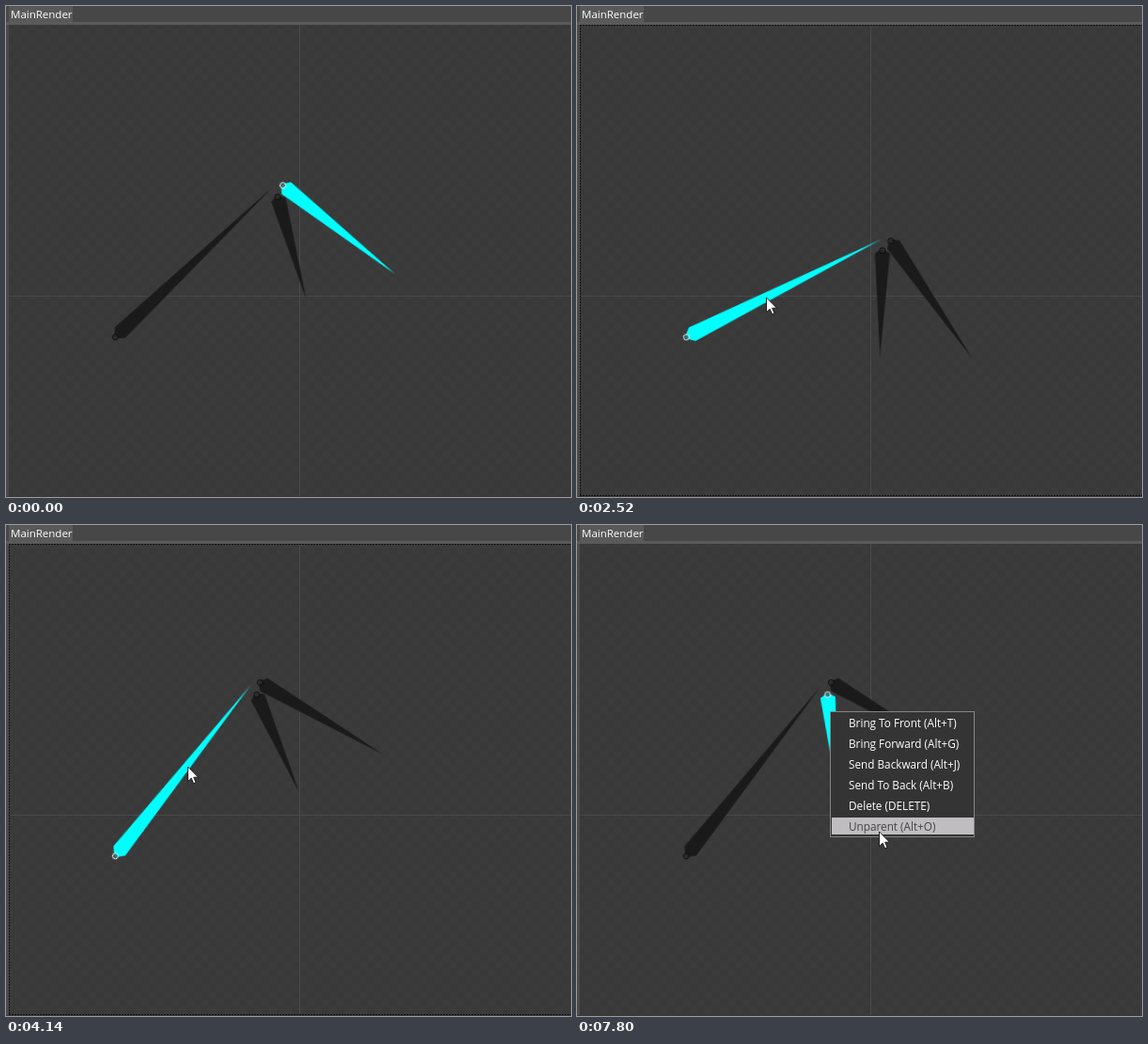
Animation, 601 px wide and 522 px high, one loop 8000 ms. Source, as an HTML page:

```html
<!DOCTYPE html>
<html lang="en">
<head>
<meta charset="utf-8">
<title>Bone editor</title>
<style>
html, body { margin: 0; width: 100%; height: 100%; overflow: hidden; background: #3a3a3a; }
svg { display: block; width: 601px; height: 522px; }
text { font-family: "Open Sans", "Noto Sans", sans-serif; }

/* All tracks share one 8 s clock, so 1% is 80 ms. */
.arm, .forearm, .cursor { animation: 8s linear infinite; }
.bone, .focus, .menu, .item { animation: 8s step-end infinite; }

.arm { transform-origin: 116px 352px; animation-name: swing; }
.forearm { transform-origin: 289px 203px; animation-name: bend; }
@keyframes swing {
  0%, 24.75% { transform: rotate(0deg); }
  27% { transform: rotate(2.7deg); }
  29.25% { transform: rotate(10deg); }
  31.5% { transform: rotate(17deg); }
  33% { transform: rotate(13deg); }
  34.5% { transform: rotate(4deg); }
  35.25% { transform: rotate(-1.5deg); }
  36% { transform: rotate(-7deg); }
  36.75% { transform: rotate(-11.2deg); }
  37.5% { transform: rotate(-14deg); }
  38.25%, 40.5% { transform: rotate(-15.4deg); }
  44.25%, 47.25% { transform: rotate(4.3deg); }
  51.75%, 100% { transform: rotate(-8deg); }
}
@keyframes bend {
  0%, 69.75% { transform: rotate(0deg); }
  72.75%, 75% { transform: rotate(-11.8deg); }
  79.5%, 100% { transform: rotate(17.6deg); }
}

.bone { color: #1a1a1a; stroke: #0b0b0b; }
.bone path { fill: currentColor; stroke: none; }
.bone circle { fill: #333; fill-opacity: .6; }
.pick-first { animation-name: first; }
.pick-second { animation-name: second; }
.pick-third { animation-name: third; }
@keyframes first {
  0% { color: #0ff; stroke: #eee; }
  23.25%, 100% { color: #1a1a1a; stroke: #0b0b0b; }
}
@keyframes second {
  0%, 69.75%, 100% { color: #1a1a1a; stroke: #0b0b0b; }
  23.25% { color: #0ff; stroke: #eee; }
}
@keyframes third {
  0% { color: #1a1a1a; stroke: #0b0b0b; }
  69.75%, 100% { color: #0ff; stroke: #eee; }
}

.focus { visibility: hidden; animation-name: focus; }
@keyframes focus {
  0%, 86.25%, 100% { visibility: hidden; }
  23.25% { visibility: visible; }
}

.menu { visibility: hidden; animation-name: open; font-size: 11.75px; }
@keyframes open {
  0% { visibility: hidden; }
  87%, 100% { visibility: visible; }
}
.item { color: #fff; fill-opacity: 0; animation-name: hover; animation-delay: calc(var(--i) * 87ms); }
.item rect { fill: #bfbdbf; }
.item text { fill: currentColor; fill-opacity: 1; }
.item.last { animation-name: stay; animation-delay: 0s; }
@keyframes hover {
  0%, 88.98%, 100% { color: #fff; fill-opacity: 0; }
  87.9% { color: #444; fill-opacity: 1; }
}
@keyframes stay {
  0% { color: #fff; fill-opacity: 0; }
  93.3%, 100% { color: #444; fill-opacity: 1; }
}

.cursor { animation-name: point; }
@keyframes point {
  0%, 9.74% { transform: translate(384px, 395px); }
  9.75% { transform: translate(384px, 395px); }
  15.75%, 24.75% { transform: translate(181px, 292px); }
  27% { transform: translate(185px, 292px); }
  31.5% { transform: translate(201px, 309px); }
  35.25% { transform: translate(189px, 279px); }
  36.75% { transform: translate(180px, 260px); }
  38.25%, 40.5% { transform: translate(174px, 255px); }
  44.25%, 47.25% { transform: translate(207px, 278px); }
  51.75%, 59.25% { transform: translate(193px, 256px); }
  63.5% { transform: translate(286px, 205px); }
  65.25%, 69.75% { transform: translate(272px, 192px); }
  72.75%, 75% { transform: translate(276px, 193px); }
  79.5%, 87.75% { transform: translate(269px, 198px); }
  94%, 100% { transform: translate(321px, 325px); }
}
.arrow { animation: blink 8s step-end infinite; }
@keyframes blink {
  0%, 94.5% { visibility: hidden; }
  9.75%, 97.5%, 100% { visibility: visible; }
}
</style>
</head>
<body>
<svg viewBox="0 0 601 522">
  <defs>
    <pattern id="checker" width="16" height="16" patternUnits="userSpaceOnUse">
      <rect width="16" height="16" fill="#3b3b3b"/>
      <path d="M0 0h8v8H0zM8 8h8v8H8z" fill="#393939"/>
    </pattern>
  </defs>

  <!-- panel -->
  <rect width="601" height="522" fill="#474747"/>
  <rect x="3" width="68" height="17" fill="#595959"/>
  <rect y="17" width="601" height="3" fill="#5a5a5a"/>
  <rect y="20" width="3" height="502" fill="#4a4a4a"/>
  <rect x="3" y="20" width="598" height="501" fill="url(#checker)"/>
  <path d="M3 308.5H601M312.5 20V521" stroke="#494949"/>
  <rect y="521" width="601" height="1" fill="#3f363a"/>
  <text x="5" y="13" font-size="11.5" fill="#fff">MainRender</text>
  <path class="focus" d="M3 20.5H601M3.5 20V521M3 520.5H601" fill="none" stroke="#111" stroke-dasharray="2 1"/>

  <!-- skeleton -->
  <g class="arm">
    <g class="bone pick-second" transform="translate(116.3 352) rotate(-43.6)">
      <path d="M-2 0L7-8L232 0L7 8z"/>
      <circle r="3"/>
    </g>
    <g class="forearm">
      <g class="bone pick-third" transform="translate(289 203) rotate(74.4)">
        <path d="M-2 0L3-8L113.5 0L3 8z"/>
        <circle r="3"/>
      </g>
    </g>
    <g class="bone pick-first" transform="translate(294.5 190.7) rotate(38.3)">
      <path d="M-2 0L4.6-8L152.5 0L4.6 8z"/>
      <circle r="3"/>
    </g>
  </g>

  <!-- context menu -->
  <g class="menu">
    <rect x="269.5" y="198.5" width="153" height="133" fill="#343434" stroke="#858585"/>
    <g class="item" style="--i:0"><rect x="271" y="201" width="151" height="18"/><text x="289" y="215">Bring To Front (Alt+T)</text></g>
    <g class="item" style="--i:1"><rect x="271" y="223" width="151" height="18"/><text x="289" y="237">Bring Forward (Alt+G)</text></g>
    <g class="item" style="--i:2"><rect x="271" y="245" width="151" height="18"/><text x="289" y="259">Send Backward (Alt+J)</text></g>
    <g class="item" style="--i:3"><rect x="271" y="267" width="151" height="18"/><text x="289" y="281">Send To Back (Alt+B)</text></g>
    <g class="item" style="--i:4"><rect x="271" y="289" width="151" height="18"/><text x="289" y="303">Delete (DELETE)</text></g>
    <g class="item last"><rect x="271" y="311" width="151" height="18"/><text x="289" y="325">Unparent (Alt+O)</text></g>
  </g>

  <g class="cursor">
    <path class="arrow" d="M.5 1V16.6L4.2 13.2L6.6 18.8L9 17.8L6.7 12.2H11.5z" fill="#fff" stroke="#111" stroke-width=".9"/>
  </g>
</svg>
</body>
</html>
```
